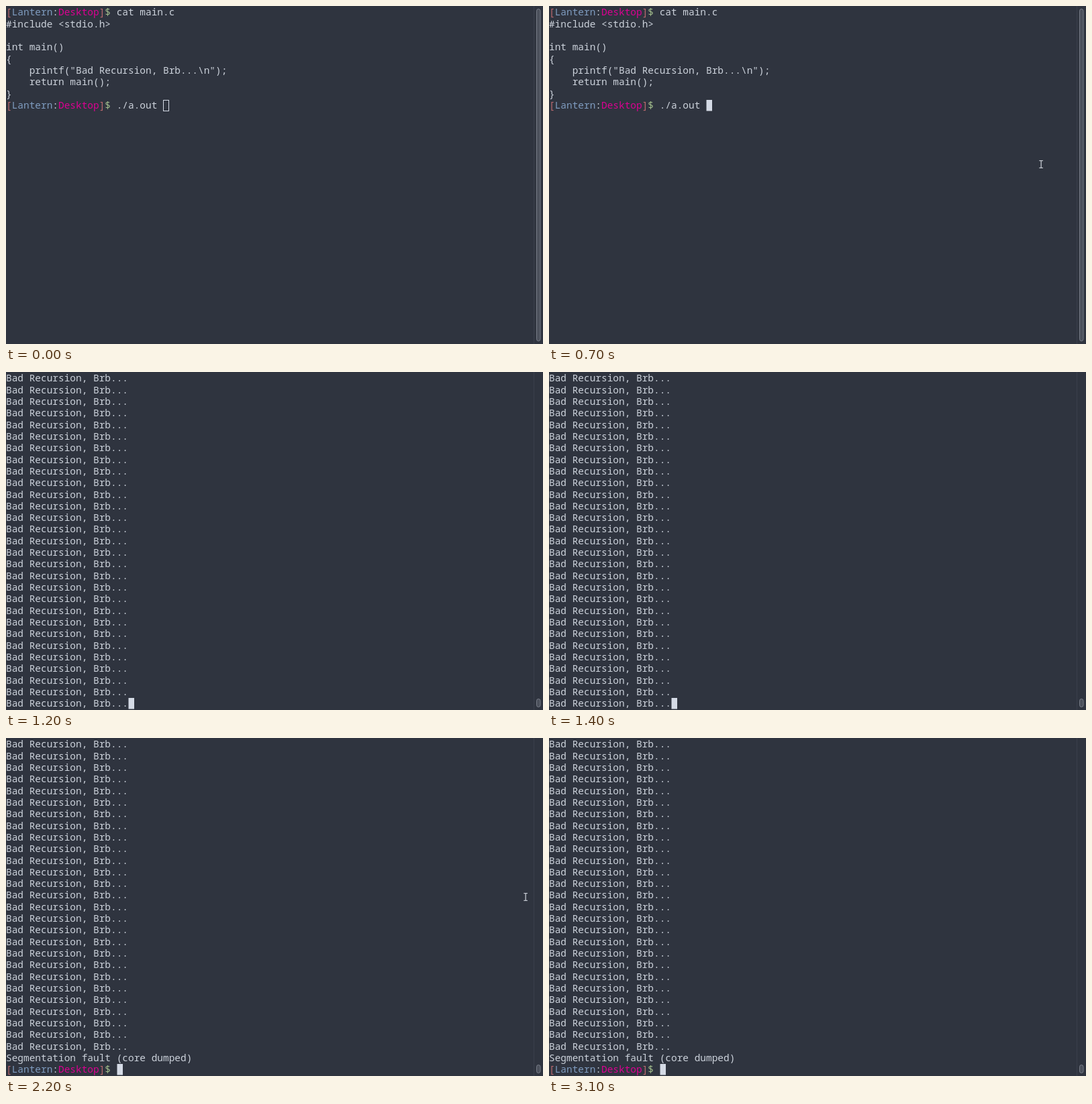
An HTML page with a canvas that plays this animation: 800 by 504 pixels, repeating every 3.3 s.

```html
<!DOCTYPE html>
<html lang="en">
<head>
<meta charset="utf-8">
<title>Bad recursion</title>
<style>
html, body { margin: 0; width: 100%; height: 100%; overflow: hidden; background: #2f343f; }
canvas { display: block; width: 800px; height: 504px; }
</style>
</head>
<body>
<canvas id="stage" width="800" height="504"></canvas>
<script>
const ctx = document.getElementById('stage').getContext('2d');
const LOOP = 3300, STEP = 100;
const CELL = 8.667, LINE = 17.32, BASE = 14.3, LAST = 28;
const BG = '#2f343f', FG = '#ccd2db', CURSOR = '#d5dbe6';
const RED = '#bd6a70', BLUE = '#7f9cc0', PINK = '#dc0092', GREEN = '#a3be8c';

const MESSAGE = 'Bad Recursion, Brb...';
const LISTING = [
  '#include <stdio.h>', '', 'int main()', '{',
  '    printf("' + MESSAGE + '\\n");', '    return main();', '}'
];
const PROMPT = [['[', RED], ['Lantern', BLUE], [':', FG], ['Desktop', PINK], [']', RED], ['$', GREEN]];

// Pointer position at each 100 ms step after the given start
const ENTER = { from: 100, path: [[744, 232], [736, 233], [731, 234], [730, 234], [732, 235], [733, 236]] };
const LEAVE = { from: 2200, path: [[774, 237], [785, 237], [795, 238]] };

function print(text, col, row, color = FG) {
  ctx.fillStyle = color;
  [...text].forEach((ch, i) => {
    if (ch !== ' ') ctx.fillText(ch, (col + i) * CELL, BASE + row * LINE);
  });
}

function prompt(row, command = '') {
  let col = 0;
  for (const [text, color] of PROMPT) {
    print(text, col, row, color);
    col += text.length;
  }
  print(command, col + 1, row);
}

function cursor(col, row, filled = true) {
  const x = Math.round(col * CELL), y = Math.round(1 + row * LINE);
  ctx.fillStyle = ctx.strokeStyle = CURSOR;
  ctx.lineWidth = 1;
  if (filled) ctx.fillRect(x + 0.5, y, 8.5, 16.5);
  else ctx.strokeRect(x + 0.5, y + 0.5, 8, 16);
}

function scrollbar(top) {
  ctx.fillStyle = '#3a3f4b';
  ctx.fillRect(786, 0, 1, 504);
  ctx.beginPath();
  ctx.roundRect(790.5, top + 0.5, 5.5, 499 - top, 2.75);
  ctx.fillStyle = '#4b505b';
  ctx.strokeStyle = '#777c87';
  ctx.lineWidth = 1;
  ctx.fill();
  ctx.stroke();
}

function pointer({ from, path }, t, stay) {
  let i = Math.floor((t - from) / STEP);
  if (i < 0) return;
  if (stay) i = Math.min(i, path.length - 1);
  if (!path[i]) return;
  const [x, y] = path[i];
  ctx.fillStyle = '#c3c8d0';
  ctx.fillRect(x - 0.5, y - 5, 1.3, 10);
  ctx.fillRect(x - 2.7, y - 6, 5.6, 1.2);
  ctx.fillRect(x - 2.7, y + 4.8, 5.6, 1.2);
}

function source(t) {
  prompt(0, 'cat main.c');
  LISTING.forEach((text, i) => print(text, 0, i + 1));
  prompt(8, './a.out');
  cursor(27, 8, t >= 100);
  scrollbar(4);
  pointer(ENTER, t, true);
}

function output(t) {
  const crashed = t >= 2200;
  const rows = crashed ? LAST - 1 : LAST;
  for (let r = 0; r < rows; r++) print(MESSAGE, 0, r);
  if (crashed) {
    print('Segmentation fault (core dumped)', 0, LAST - 1);
    prompt(LAST);
    cursor(19, LAST);
  } else {
    const fullLine = t < 1500 && Math.floor(t / STEP) % 2 === 0;
    if (fullLine) print(MESSAGE, 0, LAST);
    cursor(fullLine ? MESSAGE.length : 0, LAST);
  }
  scrollbar(487);
  pointer(LEAVE, t, false);
}

function draw(now) {
  const t = now % LOOP;
  ctx.fillStyle = BG;
  ctx.fillRect(0, 0, 800, 504);
  ctx.font = '14.44px "Noto Sans Mono", "DejaVu Sans Mono", monospace';
  if (t < 1200) source(t);
  else output(t);
}

const start = performance.now();
function tick() {
  draw(performance.now() - start);
  requestAnimationFrame(tick);
}
tick();
</script>
</body>
</html>
```
